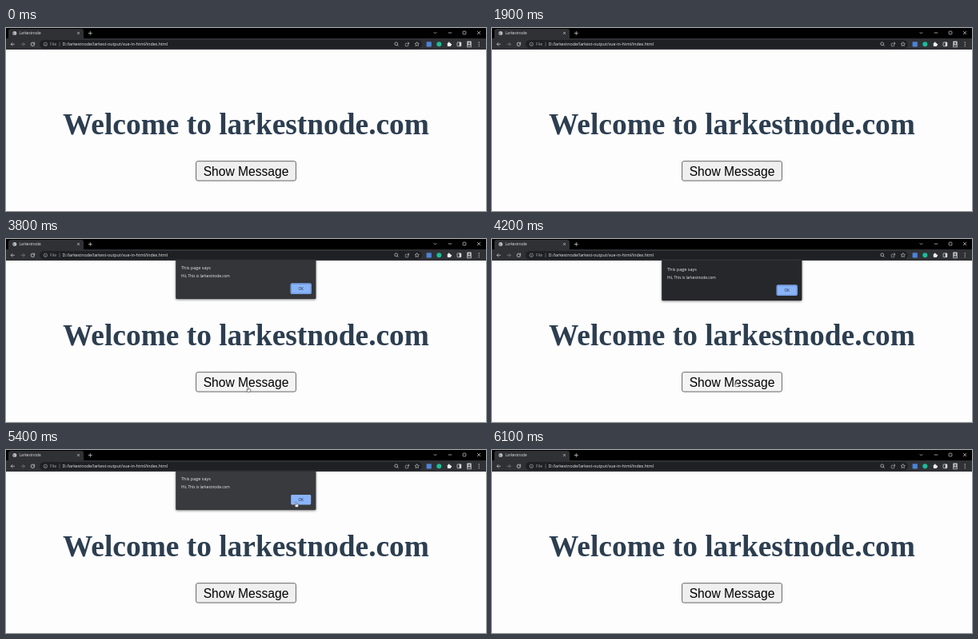
An HTML page with a canvas for the animation above (7000 ms loop, 600x229 px).

```html
<!DOCTYPE html>
<html lang="en">
<head>
<meta charset="utf-8">
<title>Larkestnode</title>
<style>
html, body { margin: 0; width: 100%; height: 100%; overflow: hidden; background: #fefdfe; }
canvas { display: block; width: 600px; height: 229px; }
</style>
</head>
<body>
<canvas id="stage"></canvas>
<script>
const W = 600, H = 229, LOOP = 7000, STEP = 100;
const BAR = 27, MID = 20.3;
const SANS = '"Open Sans", "Noto Sans", sans-serif';
const ICON = '#d4d6d9', DIM = '#a5a8ac', PANEL = '#303135', BLUE = '#8ab4f8';
const canvas = document.getElementById('stage');
const ctx = canvas.getContext('2d');
const ratio = window.devicePixelRatio || 1;
canvas.width = W * ratio;
canvas.height = H * ratio;

function paint(fill, stroke, width = 0.7) {
  if (fill) { ctx.fillStyle = fill; ctx.fill(); }
  if (stroke) { ctx.strokeStyle = stroke; ctx.lineWidth = width; ctx.stroke(); }
}

function rect(x, y, w, h, r, fill, stroke, width) {
  ctx.beginPath();
  ctx.roundRect(x, y, w, h, r);
  paint(fill, stroke, width);
}

function circle(x, y, r, fill, stroke, width) {
  ctx.beginPath();
  ctx.arc(x, y, r, 0, 2 * Math.PI);
  paint(fill, stroke, width);
}

function square(x, y, r, fill, stroke) {
  rect(x - r, y - r, 2 * r, 2 * r, 0.6, fill, stroke);
}

function line(x0, y0, x1, y1, color = ICON, width = 0.7) {
  ctx.beginPath();
  ctx.moveTo(x0, y0);
  ctx.lineTo(x1, y1);
  paint(null, color, width);
}

function chevron(x, y, r, angle, color = ICON) {
  ctx.save();
  ctx.translate(x, y);
  ctx.rotate(angle);
  line(0, 0, -r, -r, color);
  line(0, 0, -r, r, color);
  ctx.restore();
}

function cross(x, y, r) {
  line(x - r, y - r, x + r, y + r);
  line(x - r, y + r, x + r, y - r);
}

function text(str, x, y, font, color, align = 'left') {
  ctx.font = font;
  ctx.fillStyle = color;
  ctx.textAlign = align;
  ctx.fillText(str, x, y);
}

function drawTabs() {
  rect(0, 0, W, 14, 0, '#000');
  rect(3, 1, 94, 14, [3, 3, 0, 0], PANEL);
  circle(10.8, 6.4, 2.5, '#b9bcc0');
  line(9, 5.4, 10.8, 8.4, '#55585c');
  text('Larkestnode', 16.5, 8.4, '4.7px ' + SANS, '#e4e6e9');
  cross(90.5, 6.4, 1.5);
  line(102.8, 6.5, 107.8, 6.5);
  line(105.3, 4, 105.3, 9);
  chevron(536.5, 7, 1.8, Math.PI / 2);
  line(552.7, 6, 557.3, 6);
  square(573, 6, 1.9, null, ICON);
  cross(591, 6, 2);
}

function drawArrow(x, dir, color) {
  line(x - 2.4, MID, x + 2.4, MID, color);
  chevron(x + dir * 2.4, MID, 2.2, dir < 0 ? Math.PI : 0, color);
}

function drawStar(x, y, r) {
  ctx.beginPath();
  for (let i = 0; i < 10; i++) {
    const a = -Math.PI / 2 + i * Math.PI / 5;
    const d = i % 2 ? r * 0.48 : r;
    ctx.lineTo(x + d * Math.cos(a), y + d * Math.sin(a));
  }
  ctx.closePath();
  paint(null, ICON, 0.6);
}

function drawAddress() {
  rect(42, 15, 478, 10.6, 5.3, '#1f2023');
  circle(49.3, MID, 2.2, null, DIM);
  line(49.3, 20, 49.3, 21.5, DIM);
  text('File', 55, 22.2, '5.2px ' + SANS, DIM);
  line(67, 17.6, 67, 23, '#74777b');
  text('D:/larkestnode/larkest-output/vue-in-html/index.html', 70.5, 22.2, '5.3px ' + SANS, '#eceef0');
  circle(487.7, 19.8, 1.9, null, ICON);
  line(489.1, 21.2, 490.6, 22.7);
  square(501, 21, 1.8, null, DIM);
  chevron(504, 19, 1.5, 0);
  drawStar(513.7, MID, 2.8);
}

function drawToolbar() {
  rect(0, 13, W, BAR - 13, 0, PANEL);
  drawArrow(8.5, -1, ICON);
  drawArrow(21, 1, '#85878a');
  ctx.beginPath();
  ctx.arc(33.4, MID, 2.2, 0, 5.4);
  paint(null, ICON, 0.8);
  chevron(35.6, 19.8, 1.5, Math.PI / 4);
  drawAddress();

  square(528.7, MID, 3.1, '#4d83d8');
  circle(541.3, MID, 3, '#18bf98');
  square(553.9, 20.8, 2.1, '#f0f1f2');
  circle(553.7, 18.4, 1, '#f0f1f2');
  circle(556.2, 20.8, 1, '#f0f1f2');
  square(566.4, MID, 2.4, null, '#e4e6e8');
  rect(566.7, 17.9, 2.1, 4.8, 0, '#e4e6e8');
  // plain profile silhouette
  rect(576.3, 16.4, 5.4, 7.8, 0.5, '#c9cac8');
  circle(579, 19, 1.3, '#55585c');
  rect(577, 20.7, 4, 3, [2, 2, 0, 0], '#55585c');
  for (let i = -1; i < 2; i++) circle(591.2, MID + i * 2.3, 0.65, ICON);
}

function drawPage(button, border) {
  rect(0, 0, W, H, 0, '#fefdfe');
  text('Welcome to larkestnode.com', 300, 133,
    'bold 37.4px "Liberation Serif", "Times New Roman", serif', '#2c3e50', 'center');
  rect(237.6, 166.7, 124.8, 24.4, 2.2, button, border, 1);
  text('Show Message', 300, 184.6,
    '15.6px "Liberation Sans", Arial, sans-serif', '#000', 'center');
}

function drawDialog(fill, drop, ring) {
  ctx.save();
  ctx.beginPath();
  ctx.rect(0, BAR, W, H);
  ctx.clip();
  ctx.translate(0, drop);
  ctx.shadowColor = 'rgba(0,0,0,.5)';
  ctx.shadowBlur = 3 * ratio;
  ctx.shadowOffsetY = ratio;
  rect(212.2, BAR - 4, 175.2, 52, 1.5, fill);
  ctx.shadowColor = 'transparent';
  text('This page says', 219, 37.6, '5.5px ' + SANS, '#e8eaed');
  text('Hii, This is larkestnode.com', 219, 48.1, '4.8px ' + SANS, '#eceef0');
  rect(356.2, 56, 25, 12.4, 1.3, BLUE, ring && BLUE, 1.4);
  if (ring) rect(356.4, 56.2, 24.6, 12, 1.3, null, '#5279b8', 0.6);
  text('OK', 368.7, 64, '4.7px ' + SANS, '#202a3c', 'center');
  ctx.restore();
}

function drawPointer(x, y, hand) {
  ctx.save();
  ctx.translate(x, y);
  if (hand) {
    rect(-0.9, 2.6, 4.6, 3.8, 1.3, '#fff', '#333', 0.6);
    rect(-0.2, 0, 1.4, 4, 0.7, '#fff', '#333', 0.5);
  } else {
    line(1.4, 4, 3, 7.8, '#222', 1.8);
    ctx.beginPath();
    ctx.moveTo(0, 0);
    ctx.lineTo(0, 7);
    ctx.lineTo(5, 5);
    ctx.closePath();
    paint('#fff', '#222', 0.6);
    line(1.4, 4, 3, 7.6, '#fff', 0.9);
  }
  ctx.restore();
}

// pointer key points: time, x, y
const trails = [
  [[900, 540, 20], [1300, 302, 207]],
  [[1600, 293, 149], [1800, 295, 155]],
  [[3200, 309, 174], [3300, 302, 185], [4100, 302, 185], [4800, 351, 63.5],
    [4900, 362, 65], [5600, 362, 65], [6000, 302, 210]]
];

function pointerAt(t) {
  const trail = trails.find(k => t >= k[0][0] && t <= k.at(-1)[0]);
  if (!trail) return null;
  const i = Math.max(1, trail.findIndex(k => k[0] >= t));
  const [t0, x0, y0] = trail[i - 1], [t1, x1, y1] = trail[i];
  const k = (t - t0) / (t1 - t0);
  const e = k * k * (3 - 2 * k);
  return { x: x0 + (x1 - x0) * e, y: y0 + (y1 - y0) * e };
}

function inside(p, x, y, w, h) {
  return p && p.x >= x && p.x <= x + w && p.y >= y && p.y <= y + h;
}

function draw(t) {
  const p = pointerAt(t);
  const open = t >= 3800 && t < 5600;
  const hover = inside(p, 237, 166, 126, 26);
  const onOk = open && inside(p, 356, 56, 25, 14);
  const pressed = t >= 3600 && t < 5000;
  const button = pressed ? '#f4f4f4' : hover ? '#e4e4e4' : '#efefef';
  drawPage(button, hover && !open ? '#3c3c3c' : '#666');
  drawTabs();
  drawToolbar();
  if (open) {
    // settles and darkens over two steps, then lifts on press
    const drop = t < 5000 ? Math.min(2, (t - 3800) / STEP) : 0;
    const shade = t < 5000 ? 52 - 7 * drop : 57;
    drawDialog(`rgb(${shade - 1},${shade + 1},${shade + 4})`, drop, t < 4900);
  }
  if (p) drawPointer(p.x, p.y, hover || onOk);
}

function tick() {
  const t = performance.now() % LOOP;
  ctx.setTransform(ratio, 0, 0, ratio, 0, 0);
  draw(Math.floor(t / STEP) * STEP);
  requestAnimationFrame(tick);
}
tick();
</script>
</body>
</html>
```
